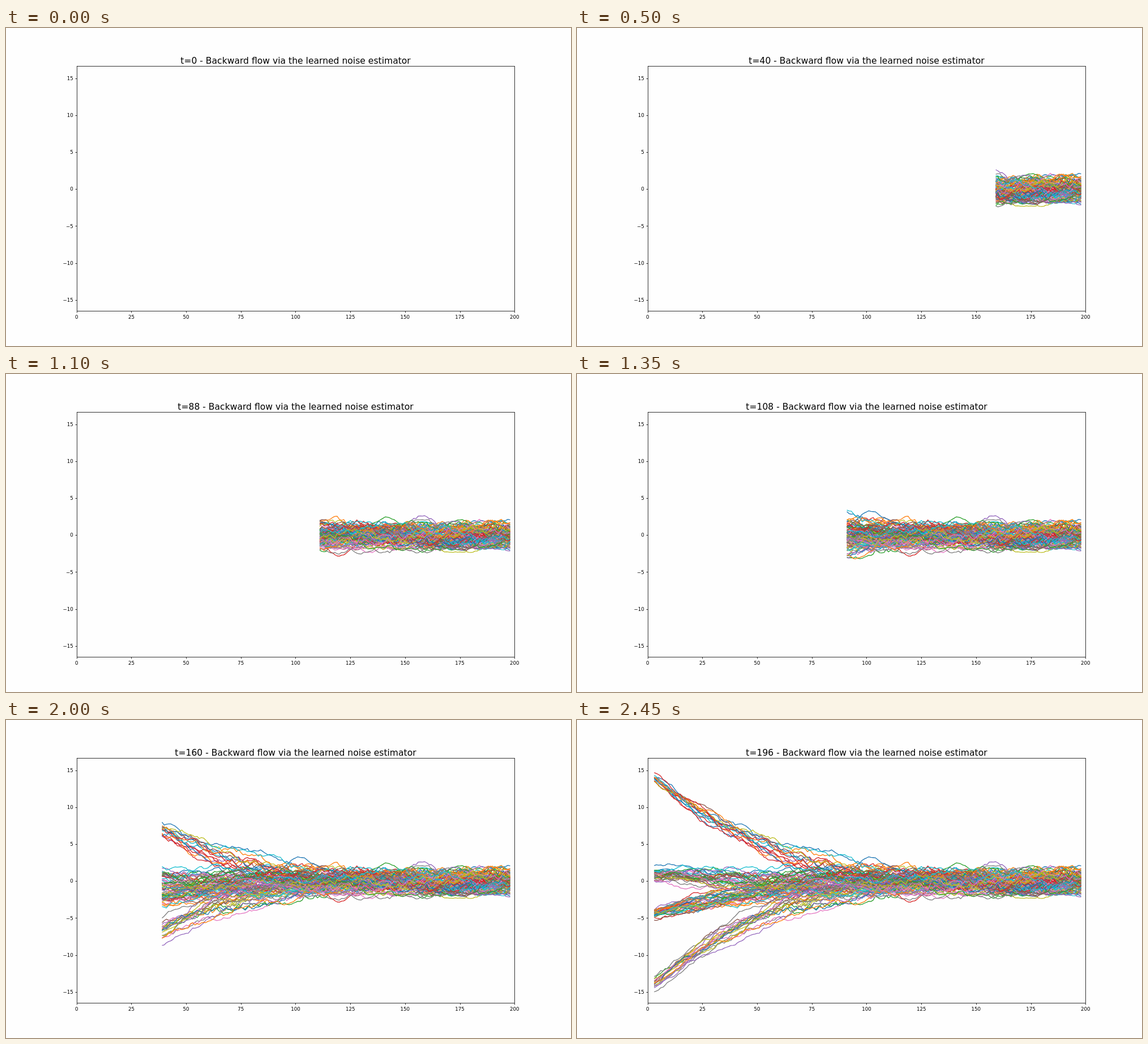
An HTML page with a canvas for the animation above (2.5 s loop, 998 by 561 pixels).

```html
<!DOCTYPE html>
<html lang="en">
<head>
<meta charset="utf-8">
<title>Backward flow</title>
<style>
  html, body { margin: 0; width: 100%; height: 100%; overflow: hidden; background: #fefefe; }
  canvas { display: block; }
</style>
</head>
<body>
<canvas id="plot" width="998" height="561"></canvas>
<script>
const ctx = document.getElementById('plot').getContext('2d');
const FIRST = 3, LAST = 198, LINES = 100, STEP_MS = 50, LOOP_MS = 2500;
const BOX = { left: 125.5, top: 67.5, right: 898.5, bottom: 499.5 };
const COLORS = ['#1f77b4', '#ff7f0e', '#2ca02c', '#d62728', '#9467bd',
                '#8c564b', '#e377c2', '#7f7f7f', '#bcbd22', '#17becf'];
const px = x => 124.75 + x * 3.8673;
const py = y => 284.1 - y * 13.04;

const MODES = [
  { centre: 13.8, spread: 0.4, upTo: 0.16 },
  { centre: 0.9, spread: 0.5, upTo: 0.45 },
  { centre: -4.3, spread: 0.4, upTo: 0.75 },
  { centre: -13.8, spread: 0.55, upTo: 1 }
];

// The most visible excursions out of the band, by line index
const PEAKS = {
  14: { at: 158, y: 3.2, width: 8 },
  33: { at: 120, y: -3.6, width: 10 },
  40: { at: 102, y: 4.1, width: 13 },
  58: { at: 172, y: -2.9, width: 16 },
  72: { at: 141, y: 3.1, width: 10 }
};

let seed = 7;
function random() {
  seed = seed + 0x6d2b79f5 | 0;
  let r = Math.imul(seed ^ seed >>> 15, seed | 1);
  r ^= r + Math.imul(r ^ r >>> 7, r | 61);
  return ((r ^ r >>> 14) >>> 0) / 4294967296;
}
const gauss = () => (random() + random() + random() - 1.5) * 2;

// Share of a cluster's centre that is left at x
const logDecay = x => -x / 60 - x * x / 12000;
const decay = x => Math.exp(logDecay(x) - logDecay(FIRST));

// Random walk pulled towards the shrinking centre of its cluster
function diffuse(peak) {
  const share = random();
  const { centre, spread } = MODES.find(m => share < m.upTo);
  const line = [];
  let offset = gauss() * spread;
  for (let x = FIRST; x <= LAST; x++) {
    line[x] = centre * decay(x) + 2.8 * Math.tanh(offset / 2.8);
    if (peak) {
      const pull = 0.8 * Math.exp(-(((x - peak.at) / peak.width) ** 2));
      line[x] += pull * (peak.y - line[x]);
    }
    const rate = 1 / 60 + x / 6000;
    offset += gauss() * Math.sqrt(2 * rate) * Math.min(1, 0.7 + x / 250) - rate * offset;
  }
  return line;
}

const lines = Array.from({ length: LINES }, (_, i) => diffuse(PEAKS[i]));

function text(string, x, y, size, align) {
  ctx.font = `${size}px "DejaVu Sans", sans-serif`;
  ctx.textAlign = align;
  ctx.fillText(string, x, y);
}

function segment(x0, y0, x1, y1) {
  ctx.beginPath();
  ctx.moveTo(x0, y0);
  ctx.lineTo(x1, y1);
  ctx.stroke();
}

function drawAxes(t) {
  ctx.fillStyle = ctx.strokeStyle = '#000';
  ctx.lineWidth = 0.8;
  ctx.lineJoin = 'miter';
  ctx.strokeRect(BOX.left, BOX.top, BOX.right - BOX.left, BOX.bottom - BOX.top);
  for (let v = 0; v <= 200; v += 25) {
    const x = Math.round(px(v)) + 0.5;
    segment(x, BOX.bottom, x, BOX.bottom + 3);
    text(v, px(v), 512.6, 8.663, 'center');
  }
  for (let v = -15; v <= 15; v += 5) {
    const y = Math.round(py(v)) + 0.5;
    segment(BOX.left - 3, y, BOX.left, y);
    text(String(v).replace('-', '\u2212'), 118.7, py(v) + 3.3, 8.663, 'right');
  }
  text(`t=${t} - Backward flow via the learned noise estimator`, 511.5, 62.6, 15.594, 'center');
}

function drawLines(t) {
  ctx.lineWidth = 1.3;
  ctx.lineJoin = 'round';
  lines.forEach((line, i) => {
    ctx.strokeStyle = COLORS[i % COLORS.length];
    ctx.beginPath();
    for (let x = LAST; x > LAST - t; x--) ctx.lineTo(px(x), py(line[x]));
    ctx.stroke();
  });
}

function draw() {
  const t = 4 * Math.floor(performance.now() % LOOP_MS / STEP_MS);
  ctx.fillStyle = '#fefefe';
  ctx.fillRect(0, 0, 998, 561);
  drawLines(t);
  drawAxes(t);
  requestAnimationFrame(draw);
}
draw();
</script>
</body>
</html>
```
